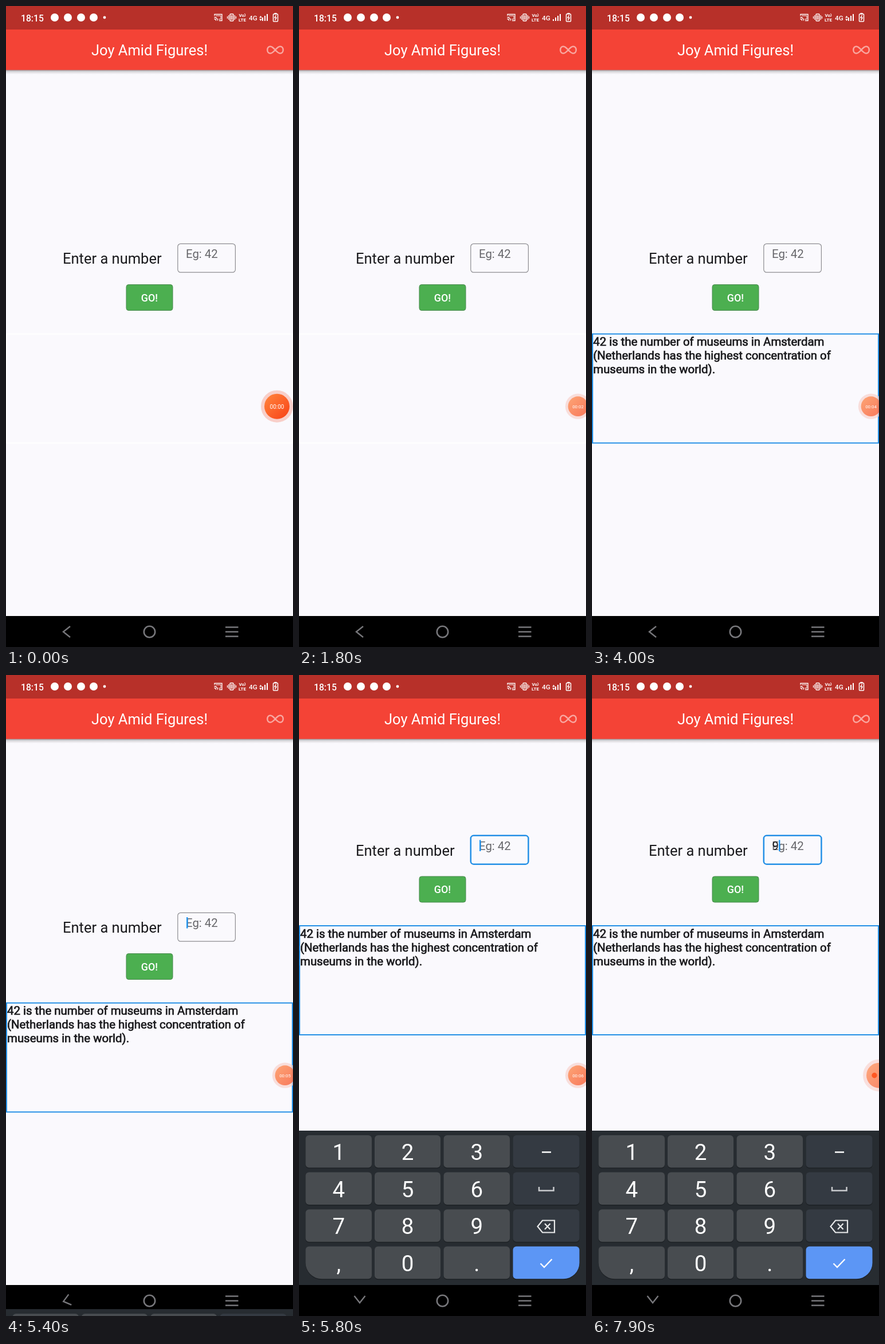
Recreate the animation shown at these times as an HTML page with a canvas. Size 501 px wide and 1117 px high, loop 8000 ms.

```html
<!DOCTYPE html>
<html lang="en">
<head>
<meta charset="utf-8">
<title>Number facts</title>
<style>
  html, body { margin: 0; width: 100%; height: 100%; overflow: hidden; background: #faf9fd; }
  canvas { display: block; width: 501px; height: 1117px; }
</style>
</head>
<body>
<canvas id="stage"></canvas>
<script>
const W = 501, H = 1117, LOOP = 8000, STEP = 100;
const BLUE = '#2490e6', INK = '#19191c';
const canvas = document.getElementById('stage');
const ctx = canvas.getContext('2d');
const ratio = window.devicePixelRatio || 1;
canvas.width = W * ratio;
canvas.height = H * ratio;

const lerp = (a, b, p) => a + (b - a) * p;
const progress = (t, start, end) => Math.min(1, Math.max(0, (t - start) / (end - start)));
const between = (t, start, end) => t >= start && t < end;

function rect(x, y, w, h, color) {
  ctx.fillStyle = color;
  ctx.fillRect(x, y, w, h);
}

function roundRect(x, y, w, h, radius, fill, stroke, width = 1) {
  ctx.beginPath();
  ctx.roundRect(x, y, w, h, radius);
  if (fill) { ctx.fillStyle = fill; ctx.fill(); }
  if (stroke) { ctx.strokeStyle = stroke; ctx.lineWidth = width; ctx.stroke(); }
}

function circle(x, y, r, fill, stroke, width) {
  ctx.beginPath();
  ctx.arc(x, y, r, 0, Math.PI * 2);
  if (fill) { ctx.fillStyle = fill; ctx.fill(); }
  if (stroke) { ctx.strokeStyle = stroke; ctx.lineWidth = width; ctx.stroke(); }
}

function path(d, color, width) {
  ctx.strokeStyle = color;
  ctx.lineWidth = width;
  ctx.stroke(new Path2D(d));
}

function text(string, x, y, size, color, align = 'left', weight = 400) {
  ctx.font = `${weight} ${size}px Roboto, sans-serif`;
  ctx.textAlign = align;
  ctx.fillStyle = color;
  ctx.fillText(string, x, y);
}

function drawStatusBar(t) {
  const white = '#fff';
  rect(0, 0, W, 41, '#b73029');
  text('18:15', 26, 26.5, 15.7, white, 'left', 500);
  for (const x of [85, 108, 131, 153]) circle(x, 20, 7, white);
  circle(172, 20, 2.4, white);

  // Cast
  path('M364 17V14.5H377V25.5H372', white, 1.3);
  path('M363.5 19.5A6 6 0 0 1 369.5 25.5M363.5 22.5A3 3 0 0 1 366.5 25.5', white, 1.3);
  path('M366 17H375V23H371', white, 1);
  // Vibrate
  roundRect(391, 14, 6, 12, 1, null, white, 1.4);
  rect(392.5, 16, 3, 8, 'rgba(255,255,255,.7)');
  path('M388.7 16V24M386.5 18V22M399.3 16V24M401.5 18V22', white, 1.2);

  text('Vo', 406.5, 19, 8, white, 'left', 700);
  path('M416.5 13Q419.5 16 416.5 19', white, 1);
  text('LTE', 406, 27, 8, white, 'left', 700);
  text('4G', 424, 25, 11.8, white, 'left', 500);

  const dataActive = !between(t, 1200, 3000) && t < 7200;
  for (let i = 0; i < 4; i++) {
    if (dataActive && i === 0) continue;
    const height = 3 + i * 3;
    rect(443 + i * 4, 26 - height, 2, height, white);
  }
  if (dataActive) {
    ctx.fillStyle = white;
    ctx.fill(new Path2D('M442 20.5L444.5 17L447 20.5ZM442 22.5L444.5 26L447 22.5Z'));
  }

  roundRect(466.5, 14, 8, 13, 1, null, white, 1.5);
  rect(468.5, 12, 4, 2, white);
  path('M471.5 16L469 20.5H472L469.5 25', white, 1.5);
}

function drawAppBar() {
  const shadow = ctx.createLinearGradient(0, 111, 0, 119);
  shadow.addColorStop(0, 'rgba(0,0,0,.42)');
  shadow.addColorStop(.4, 'rgba(0,0,0,.14)');
  shadow.addColorStop(1, 'rgba(0,0,0,0)');
  rect(0, 111, W, 8, shadow);
  rect(0, 41, W, 70.5, '#f44336');
  text('Joy Amid Figures!', 250.5, 86, 25.5, '#fff', 'center');
  path('M470 76.5C466 72 464 70.5 461.5 70.5C454.5 70.5 454.5 82.5 461.5 82.5C464 82.5 466 81 470 76.5' +
       'C474 72 476 70.5 478.5 70.5C485.5 70.5 485.5 82.5 478.5 82.5C476 82.5 474 81 470 76.5', '#f9a7a0', 2.5);
}

function drawField(t) {
  const focus = progress(t, 5400, 5600);
  const typed = t >= 7900;
  const caretOn = between(t, 5300, 6300) || between(t, 7100, 7500) || typed;
  text('Enter a number', 99, 449, 25.5, INK);
  roundRect(299.8, 414.3, 100.6, 49.9, 5, null, focus ? BLUE : '#8d8d91', lerp(1.2, 2.5, focus));
  text('Eg: 42', 314, 439, 20.4, '#66666a');
  if (typed) text('9', 314.5, 439, 20.4, INK);
  if (caretOn) rect(typed ? 326 : 315, 422, 2.4, 19.5, '#2196f3');
}

function drawResult(t) {
  const shown = t >= 3000;
  ctx.strokeStyle = shown ? BLUE : '#fff';
  ctx.lineWidth = 2;
  ctx.strokeRect(1, 571.5, 499, 190);
  if (!shown) return;
  const lines = [
    '42 is the number of museums in Amsterdam',
    '(Netherlands has the highest concentration of',
    'museums in the world).'
  ];
  lines.forEach((line, i) => {
    const y = 592 + i * 24;
    text(line, 2, y, 20.4, INK);
    ctx.strokeStyle = INK;
    ctx.lineWidth = .7;
    ctx.strokeText(line, 2, y);
  });
}

function drawContent(t) {
  ctx.save();
  if (t >= 5700) ctx.translate(0, -134.5);
  drawField(t);
  roundRect(210, 485.5, 81, 45, 4, '#4caf50', '#498a4f', 1);
  if (between(t, 2700, 3000)) roundRect(210, 485.5, 81, 45, 4, 'rgba(255,255,255,.16)');
  text('GO!', 250.5, 514.5, 17.9, '#fff', 'center', 500);
  drawResult(t);
  ctx.restore();
}

function drawKeyboard(t) {
  if (t < 5400) return;
  const columns = [[11.5, 115.5], [132, 115], [252.5, 115.5], [373.5, 116]];
  const rows = ['123-', '456_', '789<', ',0.+'];
  ctx.save();
  ctx.translate(0, t < 5700 ? 311 * Math.pow(8 / 311, (t - 5400) / 200) : 0);
  rect(0, 794, W, 269, '#272c31');
  rows.forEach((keys, r) => columns.forEach(([x, w], c) => {
    const y = 802 + r * 64.6;
    const key = keys[c];
    const radius = [6, 6, key === '+' ? 28 : 6, key === ',' ? 28 : 6];
    const pressed = key === '9' && between(t, 7500, 7600);
    const fill = key === '+' ? '#5c96f5' : c === 3 ? '#343a42' : pressed ? '#686c70' : '#484c50';
    roundRect(x, y + 1, w, 57, radius, '#1d2125');
    roundRect(x, y, w, 56.5, radius, fill);
    if (c < 3) text(key, x + w / 2, y + 43, 38.5, '#fff', 'center');
  }));
  path('M424 831.5H440', '#fff', 2.5);
  path('M419 892V898.5H444.5V892', '#c9cbce', 2.5);
  path('M425 950.5H446V971.5H425L416.5 961ZM429 956L438.5 966M438.5 956L429 966', '#e8e9ea', 2.2);
  path('M421.5 1025.5L428 1032L441.5 1018', '#fff', 2.4);
  ctx.restore();
}

function drawNavigation(t) {
  const color = '#77777b';
  const turn = progress(t, 5350, 5650);
  ctx.save();
  ctx.translate(106, lerp(1090.5, 1088, turn));
  ctx.rotate(-turn * Math.PI / 2);
  path('M6 -9.5L-6 0L6 9.5', color, 2.4);
  ctx.restore();
  circle(250.5, 1090.5, 9.7, null, color, 2.6);
  path('M383 1082.5H405.5M383 1090.5H405.5M383 1098.5H405.5', color, 2.4);
}

function drawDisc() {
  const glow = ctx.createLinearGradient(-15, -16, 15, 16);
  glow.addColorStop(0, '#ff7c38');
  glow.addColorStop(1, '#f94b1c');
  circle(0, 0, 28, '#f8cfc9');
  circle(0, 0, 22, glow);
}

function drawRecorder(t) {
  ctx.save();
  if (t < 6700) {
    const dock = progress(t, 1600, 1800);
    const scale = lerp(1, .79, dock);
    const seconds = Math.floor((t + 300) / 1000);
    ctx.translate(lerp(473, 487, dock), 697.7);
    ctx.scale(scale, scale);
    ctx.globalAlpha = lerp(1, .65, dock);
    drawDisc();
    ctx.globalAlpha = 1;
    text('00:0' + seconds, 0, 4, 10, '#fff', 'center');
  } else {
    const scale = lerp(.8, 1, progress(t, 6700, 7300));
    ctx.translate(473, 697.7);
    ctx.scale(scale, scale);
    ctx.beginPath();
    ctx.rect(0, -29, 28, 58);
    ctx.clip();
    ctx.translate(28, 0);
    ctx.globalAlpha = .6;
    drawDisc();
    ctx.globalAlpha = 1;
    circle(-8, 0, 4.7, '#ff5722');
  }
  ctx.restore();
}

function draw(t) {
  ctx.setTransform(ratio, 0, 0, ratio, 0, 0);
  rect(0, 0, W, H, '#faf9fd');
  drawAppBar();
  drawStatusBar(t);
  drawContent(t);
  rect(0, 1063, W, 54, '#000');
  drawKeyboard(t);
  drawNavigation(t);
  drawRecorder(t);
}

const startTime = performance.now();
function tick() {
  const elapsed = (performance.now() - startTime) % LOOP;
  draw(Math.floor(elapsed / STEP) * STEP);
  requestAnimationFrame(tick);
}
tick();
</script>
</body>
</html>
```
